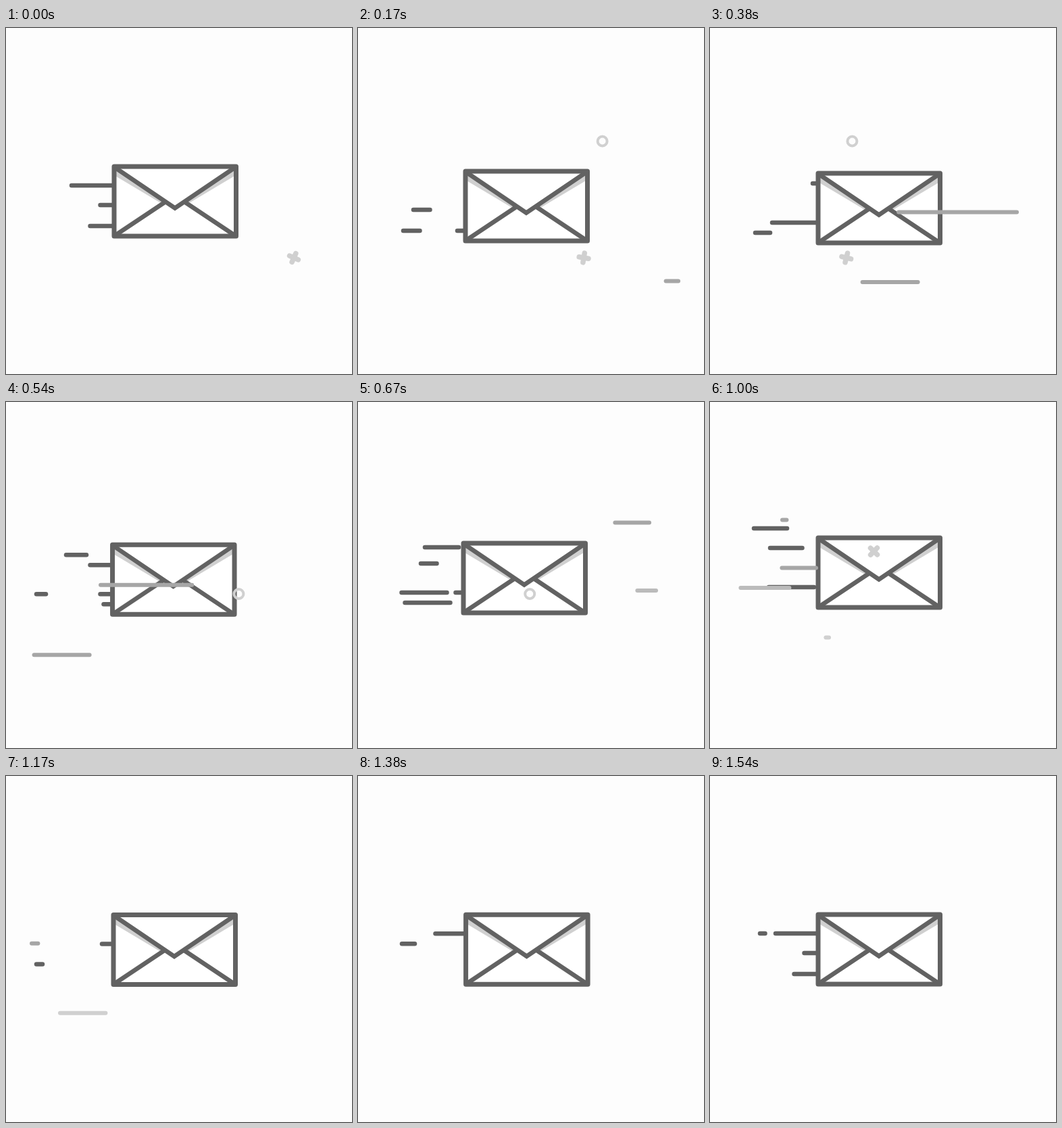
An HTML page with a canvas for the animation above (1620 ms loop, 512 px wide and 512 px high).

```html
<!DOCTYPE html>
<html lang="en">
<head>
<meta charset="utf-8">
<title>Flying envelope</title>
<style>
  html, body { margin: 0; width: 100%; height: 100%; overflow: hidden; background: #fdfdfd; }
  canvas { display: block; width: 100vmin; height: 100vmin; }
</style>
</head>
<body>
<canvas id="stage" width="512" height="512"></canvas>
<script>
const ctx = document.getElementById('stage').getContext('2d');
const LOOP = 1620, TICK = 1000 / 24, LAST = 37;
const DARK = '#626262', GREY = '#a6a6a6', PALE = '#d0d0d0';
const REST = 205;
const start = performance.now();

// Envelope corner at its turning points: [tick, x, y]
const pose = [
  [0, 160, 205], [4, 159, 212], [9, 160, 215], [16, 156, 209],
  [24, 160, 201], [28, 159, 205.5], [LAST, 160, 205]
];

// Lanes behind the envelope: height below its top, left end, start ticks.
const lanes = [
  { y: -14, to: 65, starts: [19.6] },
  { y: 6, to: 99, starts: [13] },
  { y: 15, to: 89, starts: [8.8, 20.5] },
  { y: 28, to: 74, starts: [-2.4, 31.3] },
  { y: 30, to: 93, starts: [11.7] },
  { y: 43, to: 65, starts: [27.4] },
  { y: 57, to: 82, starts: [-0.7] },
  { y: 73, to: 45, starts: [6.4, 12.3, 15.5, 21.2] },
  { y: 88, to: 67, starts: [-1.3, 3.6, 12.5] }
];

// Wind passing in front, each visible between two ends of its path.
const gusts = [
  { y: 371, from: 474, to: 28, begin: 3.6, length: 82, color: GREY },
  { y: 267.5, from: 454, to: 140, begin: 5.2, length: 180, color: GREY },
  { y: 176.5, from: 431, to: 107, begin: 14.9, length: 101, color: GREY },
  { y: 277, from: 441, to: 35, begin: 15.4, length: 72, color: '#bbb' },
  { y: 247.5, from: 157, to: 38, begin: 22.9, length: 125, color: GREY },
  { y: 350.5, from: 176, to: 80, begin: 23.9, length: 160, color: PALE }
];

const marks = [
  { draw: cross, begin: 0, y: 340, speed: 20, turn: .42 },
  { draw: ring, begin: 1.5, y: 167.5, speed: 23.5 },
  { draw: ring, begin: 9.9, y: 284, speed: 23.5 },
  { draw: cross, begin: 16.5, y: 221, speed: 20, turn: -.13 }
];

function poseAt(t) {
  const i = Math.max(1, pose.findIndex(k => t <= k[0]));
  const [t0, x0, y0] = pose[i - 1], [t1, x1, y1] = pose[i];
  const u = (1 - Math.cos(Math.PI * (t - t0) / (t1 - t0))) / 2;
  return [x0 + (x1 - x0) * u, y0 + (y1 - y0) * u];
}

function stroke(color, width, ...points) {
  ctx.strokeStyle = color;
  ctx.lineWidth = width;
  ctx.beginPath();
  points.forEach(p => ctx.lineTo(...p));
  ctx.stroke();
}

function fill(color, ...points) {
  ctx.fillStyle = color;
  ctx.beginPath();
  points.forEach(p => ctx.lineTo(...p));
  ctx.fill();
}

// A line running left, trimmed to the path between from and to.
function run(color, width, y, from, to, length, travelled) {
  const head = from - travelled;
  const left = Math.max(to, head), right = Math.min(from, head + length);
  if (left < right) stroke(color, width, [left, y], [right, y]);
}

function drawLanes(t, top) {
  for (const { y, to, starts } of lanes)
    for (const begin of starts)
      run(DARK, 6.5, top + y, 157, to, 67, 25 * (t - begin));
}

function drawGusts(t, top) {
  for (const { y, from, to, begin, length, color } of gusts)
    run(color, 6, y + (top - REST) / 2, from, to, length, 46 * (t - begin));
}

function ring() {
  ctx.strokeStyle = PALE;
  ctx.lineWidth = 4;
  ctx.beginPath();
  ctx.arc(0, 0, 7, 0, 2 * Math.PI);
  ctx.stroke();
}

function cross(age, turn) {
  ctx.rotate(turn + .33 * age);
  stroke(PALE, 7.5, [-7, 0], [7, 0]);
  stroke(PALE, 7.5, [0, -7], [0, 7]);
}

function drawMarks(t) {
  for (const { draw, begin, y, speed, turn } of marks) {
    const age = t - begin;
    const x = 426 - speed * Math.max(0, age) ** 1.1;
    if (age < 0 || x < 135) continue;
    ctx.save();
    ctx.translate(x, y);
    draw(age, turn);
    ctx.restore();
  }
}

function drawEnvelope(x, y) {
  ctx.save();
  ctx.translate(x, y);
  fill('#fff', [0, 0], [180, 0], [180, 103], [0, 103]);
  for (const side of [1, -1]) {
    ctx.save();
    ctx.translate(90, 0);
    ctx.scale(side, 1);
    fill(PALE, [-88, 2], [-88, 14], [-21, 54], [-14, 50]);
    stroke(DARK, 6.5, [-88, 101.5], [-16, 53.5]);
    ctx.restore();
  }
  ctx.lineJoin = 'miter';
  stroke(DARK, 6.5, [2, 2], [90, 61.5], [178, 2]);
  ctx.lineJoin = 'round';
  ctx.lineWidth = 7;
  ctx.strokeRect(0, 0, 180.5, 103);
  ctx.restore();
}

function draw(now) {
  const ms = Math.max(0, now - start) % LOOP;
  const t = Math.min(LAST, Math.floor((ms + 2) / TICK));
  const [x, y] = poseAt(t);

  ctx.fillStyle = '#fdfdfd';
  ctx.fillRect(0, 0, 512, 512);
  ctx.lineCap = 'round';
  drawLanes(t, y);
  drawLanes(t - LAST, y); // streaks that carry over the loop
  drawEnvelope(x, y);
  drawGusts(t, y);
  drawMarks(t);
  requestAnimationFrame(draw);
}
draw(start);
</script>
</body>
</html>
```
